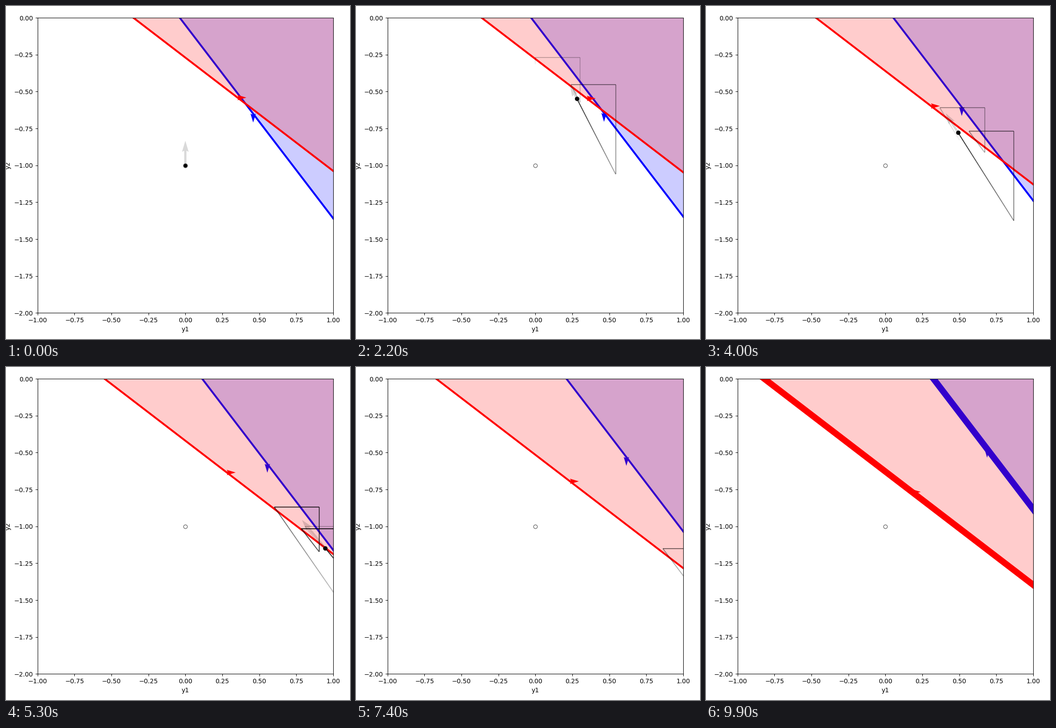
Write a matplotlib script that moves like this. It is 760 px wide and 737 px high and loops after 10 s.

```python
import numpy as np
import matplotlib.pyplot as plt
from matplotlib.animation import FuncAnimation
from matplotlib.collections import LineCollection
from matplotlib.patches import Polygon

W, H, DPI = 760, 737, 100
FRAMES, SUB = 100, 100            # frames per loop, simulation steps per frame
LEAK = np.exp(-0.1 / SUB)
JUMP = 0.303                      # readout change per spike
FADE = 10.5                       # trail lifetime in frames
START = np.array([0.0, -1.0])


class Neuron:
    """A spiking unit: a moving boundary and the direction it kicks the readout."""

    def __init__(self, color, normal, kick, level, rate, z):
        self.color, self.z = color, z
        self.n = np.array(normal)
        self.kick = np.array(kick)
        self.level, self.rate = level, rate
        self.spikes = set()

    def threshold(self, t):
        return self.level + self.rate * max(0.0, t - 20)

    def crossed(self, p, t):
        return self.n @ (p - START) > self.threshold(t)

    def add_artists(self, ax):
        self.fill = ax.add_patch(Polygon([(0, 0), (1, 0), (1, 1)], fc=self.color,
                                         ec="none", alpha=0.2, zorder=self.z))
        self.line, = ax.plot([], [], color=self.color, lw=3, zorder=self.z + 0.1)
        self.arrow = ax.quiver(*START, *self.kick * 0.3, color=self.color,
                               scale=10, width=0.0075, zorder=self.z + 0.2)

    def draw(self, k):
        d = self.threshold(k)
        x = np.array([-2.0, 3.0])
        y = START[1] + (d - self.n[0] * x) / self.n[1]
        self.line.set_data(x, y)
        self.line.set_linewidth(10 if k in self.spikes else 3)
        self.fill.set_xy([(x[0], y[0]), (x[1], y[1]), (3, 6), (-2, 6)])
        self.arrow.set_offsets([START + d * self.n])


blue = Neuron("blue", (0.795, 0.607), (0, -1), 0.577, 0.0036 * 1.015, 1.0)
red = Neuron("red", (0.609, 0.793), (1, 0), 0.579, -0.0036, 1.3)


def simulate():
    """Leak toward the origin, spiking whenever a boundary is crossed."""
    p = last = START.copy()
    dots, segs = [p], []

    def record(t, q, power):
        nonlocal last
        segs.append((t, last, q, power))
        last = q

    for i in range(1, (FRAMES - 1) * SUB + 1):
        t = i / SUB
        p = p * LEAK
        if red.crossed(p, t):
            record(t, p, 1)
            frame = int(np.ceil(t))
            p = p + JUMP * red.kick
            record(t, p, 1.5)
            red.spikes.add(frame)
            while blue.crossed(p, t):
                p = p + JUMP * blue.kick
                record(t, p, 1.2)
                blue.spikes.add(frame)
        elif i % 25 == 0:
            record(t, p, 1)
        if i % SUB == 0:
            dots.append(p)
    return dots, segs


dots, segs = simulate()

fig = plt.figure(figsize=(W / DPI, H / DPI), dpi=DPI, facecolor="white")
ax = fig.add_axes([69.5 / W, (H - 679.4) / H, 653.4 / W, 653.4 / H])
ax.set(xlim=(-1, 1), ylim=(-2, 0), xlabel="y1", ylabel="y2")
ax.set_xticks(np.linspace(-1, 1, 9))
ax.set_yticks(np.linspace(-2, 0, 9))

for unit in (blue, red):
    unit.add_artists(ax)

trail = LineCollection([], linewidths=1.5, capstyle="butt", zorder=1.6)
ax.add_collection(trail, autolim=False)
pull = ax.quiver(*START, 0, 1, color="black", alpha=0.15, scale=12,
                 width=0.0075, zorder=1.7)
dot, = ax.plot([], [], "o", color="black", ms=6, zorder=1.8)
ax.plot(*START, "o", mfc="none", mec="0.3", ms=6, alpha=0.8, zorder=1.9)


def fade(age, power):
    a = 0.82 * (1 - age / 11)
    return 1 - (1 - a) ** power


def update(k):
    for unit in (blue, red):
        unit.draw(k)
    live = [s for s in segs if k - FADE < s[0] <= k]
    trail.set_segments([(a, b) for _, a, b, _ in live])
    trail.set_color([(0, 0, 0, fade(k - t, power)) for t, _, _, power in live])
    p = dots[k]
    dot.set_data([p[0]], [p[1]])
    pull.set_offsets([p])
    pull.set_UVC([-p[0]], [-p[1]])
    return []


anim = FuncAnimation(fig, update, frames=FRAMES, interval=100,
                     init_func=lambda: [], repeat=True, repeat_delay=0, blit=False)
plt.show()
```
